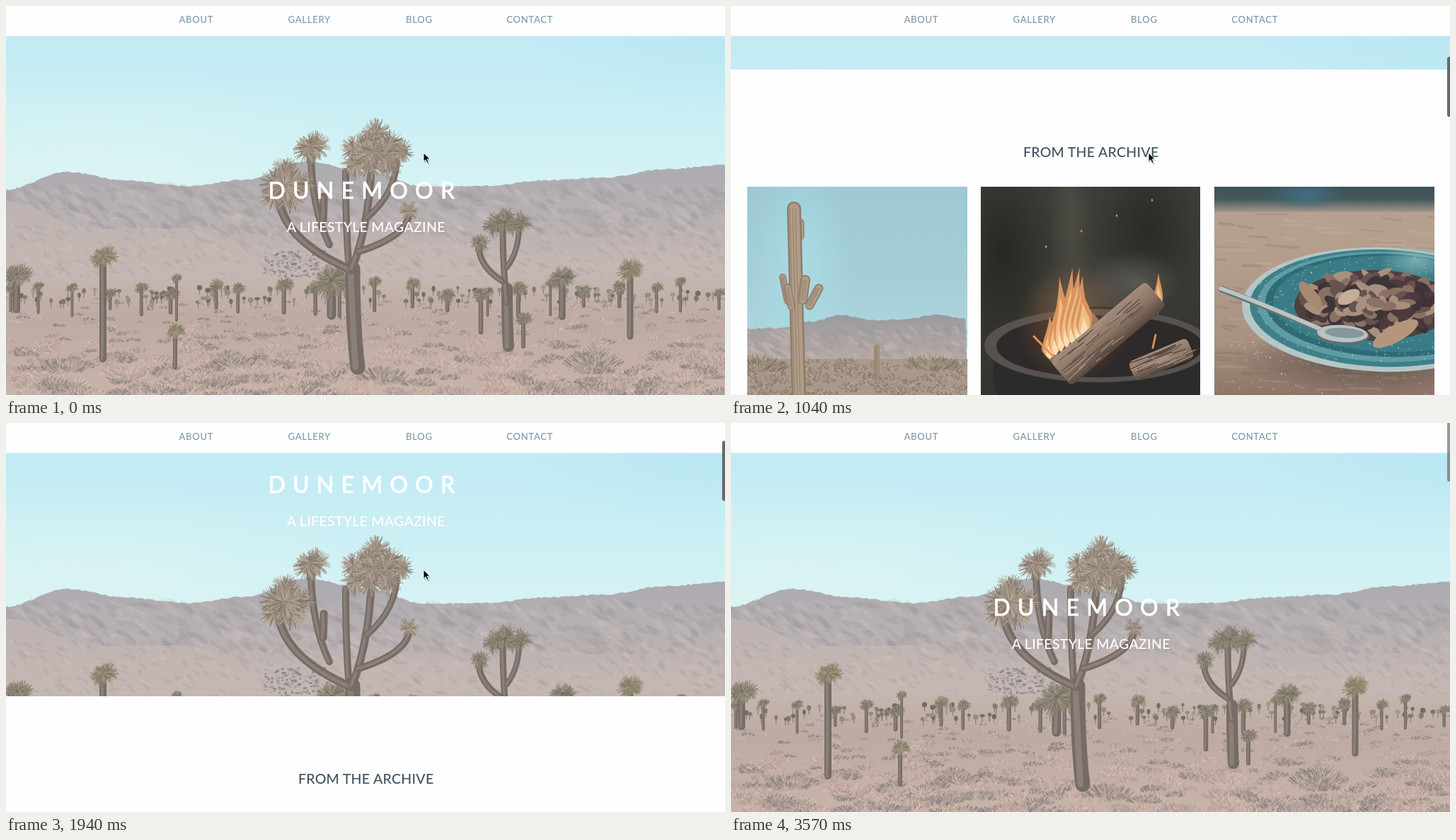
An HTML page with a canvas that plays this animation: 1016x551 px, repeating every 3.67 s.

```html
<!DOCTYPE html>
<html lang="en">
<head>
<meta charset="utf-8">
<title>Magazine page scroll</title>
<style>
  html, body { margin: 0; width: 100%; height: 100%; overflow: hidden; background: #fefefe; }
  #stage { position: absolute; left: 0; top: 0; width: 1016px; height: 551px; overflow: hidden; }
  #page, #flow, canvas, svg { position: absolute; left: 0; top: 0; }
  #page, #flow { width: 1016px; will-change: transform; }
  #paper { position: absolute; top: 561px; width: 1016px; height: 700px; background: #fefefe; }
  #paper canvas { top: 166px; }
  text { font-family: Lato, "Open Sans", sans-serif; font-weight: 500; }
  .nav { font-size: 13px; letter-spacing: .75px; fill: #7c98a9; text-anchor: middle; }
  .hero { fill: #fff; }
  .title { font-size: 32px; letter-spacing: 10.2px; stroke: #fff; stroke-width: .6px; }
  .line { font-size: 19.5px; letter-spacing: .3px; text-anchor: middle; }
  .heading { fill: #42525d; }
  #thumb { position: absolute; left: 1012px; top: 0; width: 8px; height: 85px; border-radius: 3px; background: #5f6162; }
</style>
</head>
<body>
<div id="stage">
  <div id="page">
    <canvas id="desert" width="1016" height="570"></canvas>
    <div id="flow">
      <svg width="1016" height="561">
        <text class="hero title" x="370.5" y="272.5">DUNEMOOR</text>
        <text class="hero line" x="508.7" y="319.6">A LIFESTYLE MAGAZINE</text>
      </svg>
      <div id="paper">
        <svg width="1016" height="160"><text class="heading line" x="508.7" y="124">FROM THE ARCHIVE</text></svg>
        <canvas id="cactus" width="311" height="330" style="left:23px"></canvas>
        <canvas id="fire" width="310" height="330" style="left:353px"></canvas>
        <canvas id="plate" width="311" height="330" style="left:683px"></canvas>
      </div>
    </div>
    <svg width="1016" height="43">
      <rect width="1016" height="42.4" fill="#fefefe"/>
      <text class="nav" x="268.8" y="24">ABOUT</text>
      <text class="nav" x="428.8" y="24">GALLERY</text>
      <text class="nav" x="583.8" y="24">BLOG</text>
      <text class="nav" x="740.2" y="24">CONTACT</text>
    </svg>
  </div>
  <div id="thumb"></div>
  <svg id="cursor" width="1016" height="551">
    <path d="M591 210v12.5l3-2.8 2.2 4.8 2.2-1-2.2-4.6h4z" opacity=".25"/>
    <path d="M590 208v12.4l2.9-2.7 2.1 4.8 2.2-1-2.1-4.6h4z" stroke="#fff" stroke-width=".9"/>
  </svg>
</div>
<script>
let g, seed;
const $ = id => document.getElementById(id);
const rnd = (a = 0, b = 1) => {
  seed = (seed * 1664525 + 1013904223) >>> 0;
  return a + (b - a) * seed / 4294967296;
};
const pick = list => list[Math.floor(rnd(0, list.length))];
const times = (n, fn) => { for (let i = 0; i < n; i++) fn(i); };
// Calls fn at n seeded places in a box, from top to bottom.
const scatter = (n, x0, x1, y0, y1, fn) => times(n, i => fn(rnd(x0, x1), y0 + (y1 - y0) * (i + .5) / n, i / n));
// Calls fn at n evenly packed places in an ellipse, outermost first.
const pack = (n, x, y, rx, ry, fn) => times(n, i => {
  const d = Math.sqrt((n - 1 - i) / n), a = i * 2.4;
  fn(x + rx * d * Math.cos(a), y + ry * d * Math.sin(a));
});

function picture(id, draw) {
  g = $(id).getContext('2d');
  seed = 7;
  g.lineCap = g.lineJoin = 'round';
  draw(g.canvas.width, g.canvas.height);
}
function line(color, width, x0, y0, x1, y1, cx = (x0 + x1) / 2, cy = (y0 + y1) / 2) {
  g.beginPath();
  g.moveTo(x0, y0);
  g.quadraticCurveTo(cx, cy, x1, y1);
  g.strokeStyle = color;
  g.lineWidth = width;
  g.stroke();
}
function blob(fill, x, y, rx, ry, turn = 0) {
  g.beginPath();
  g.ellipse(x, y, rx, ry, turn, 0, 7);
  g.fillStyle = fill;
  g.fill();
}
function fade(y0, y1, ...colors) {
  const f = g.createLinearGradient(0, y0, 0, y1);
  colors.forEach((c, i) => f.addColorStop(i / (colors.length - 1), c));
  return f;
}
function band(y0, y1, ...colors) {
  g.fillStyle = fade(y0, y1, ...colors);
  g.fillRect(0, y0, g.canvas.width, y1 - y0);
}
function glow(rgb, alpha, x, y, rx, ry) {
  g.save();
  g.translate(x, y);
  g.scale(rx, ry);
  const f = g.createRadialGradient(0, 0, 0, 0, 0, 1);
  f.addColorStop(0, `rgba(${rgb},${alpha})`);
  f.addColorStop(1, `rgba(${rgb},0)`);
  g.fillStyle = f;
  g.fillRect(-1, -1, 2, 2);
  g.restore();
}
// Skyline through evenly spaced heights, smoothed and slightly rough.
function ridge(fill, bottom, heights) {
  const w = g.canvas.width;
  g.beginPath();
  g.moveTo(0, bottom);
  for (let x = 0; x <= w; x += 4) {
    const u = x / w * (heights.length - 1), i = Math.min(Math.floor(u), heights.length - 2);
    const ease = (1 - Math.cos((u - i) * Math.PI)) / 2;
    g.lineTo(x, heights[i] + (heights[i + 1] - heights[i]) * ease + rnd(-1, 1));
  }
  g.lineTo(w, bottom);
  g.fillStyle = fill;
  g.fill();
}
function shade(n, y0, y1, size) {
  scatter(n, 0, g.canvas.width, y0, y1, (x, y) =>
    blob(pick(['rgba(138,138,150,.16)', 'rgba(150,140,140,.16)', 'rgba(212,200,196,.22)']),
      x, y, rnd(.3, 1) * size, rnd(.15, .3) * size, rnd(.2, .9)));
}

const LEAF = ['#b5a797', '#998b7d', '#81766a', '#a69786', '#c2b3a3', '#766c61'];
const GREEN = ['#9d967b', '#857e69', '#7b7364', '#aca384'];
const DARK = ['#827a6d', '#746c63', '#958c7a', '#a39b86'];
function tuft(x, y, r, tones) {
  blob(tones[1], x, y, r * .55, r * .55);
  times(r * 8, () => {
    const a = rnd(0, 6.283), d = r * rnd(.5, 1.1), c = Math.cos(a), s = Math.sin(a);
    line(pick(tones), .8, x + c * d * .3, y + s * d * .3, x + c * d, y + s * d);
  });
}
const crown = (n, x, y, rx, ry, r, tones = LEAF) =>
  pack(n, x, y, rx, ry, (tx, ty) => tuft(tx, ty, r * rnd(.85, 1.1), tones));
// A limb leaves sideways and then turns upwards.
function limb(width, x0, y0, x1, y1) {
  const cy = y0 + (y1 - y0) * .4;
  line('#766b66', width, x0, y0, x1, y1, x1, cy);
  line('#8b7f77', width * .4, x0 - width * .15, y0, x1 - width * .15, y1, x1, cy);
}
function tree(x, base, top, r, tones = DARK) {
  limb(r * .5, x, base, x, top);
  crown(3, x, top, r * .5, r * .6, r * .75, tones);
}
function shrub(x, y, r, tones) {
  times(r * 4, () => {
    const a = rnd(-3.1, -.05), d = r * Math.sqrt(rnd());
    const px = x + Math.cos(a) * d, py = y + Math.sin(a) * d * .55;
    line(pick(tones), 1.1, px, py, px + Math.cos(a) * r * .2, py - r * .15);
  });
}

picture('desert', (w, h) => {
  band(0, 280, '#bfe9f4', '#c5ecf4', '#cef0f4', '#d9f3f4');
  glow('222,244,242', .7, 110, 215, 420, 130);
  glow('178,228,242', .5, 1010, 60, 280, 90);

  ridge(fade(225, 390, '#acabb1', '#b9b1b1', '#c6b8b5'), 430,
    [260, 235, 247, 255, 246, 220, 234, 256, 255, 247, 243, 231, 225]);
  shade(500, 255, 325, 16);
  ridge(fade(275, 395, '#beb3b1', '#c5b7b3'), 430, [277, 316, 315, 344, 338, 335, 346, 340, 340]);
  shade(500, 310, 386, 9);
  scatter(160, 365, 455, 347, 384, (x, y) => blob(pick(['#8a8484', '#a09897', '#b9adab']), x, y, rnd(1, 3), rnd(1, 2)));

  band(384, h, '#c5b5af', '#bcaaa3', '#c4b0a9', '#cab4ac');
  const BRUSH = [
    ['#b5a19a', '#c8b5ac', '#a69690'],
    ['#978c86', '#aa9d96', '#857c77', '#b5a79e'],
    ['#c6aea4', '#d4beb3', '#b59f97'],
  ];
  scatter(160, 0, w, 398, 420, (x, y) => {
    line('#877e77', 1.2, x, y + 9, x, y);
    blob(pick(DARK), x, y, rnd(2, 4), rnd(2, 4));
  });
  scatter(650, 0, w, 414, h, (x, y, depth) => shrub(x, y, 4 + depth * 24 * rnd(.4, 1), pick(BRUSH)));
  times(9, i => shrub(60 + i * 125 + rnd(-30, 30), 520 + 12 * Math.sin(i * 2), rnd(25, 42), BRUSH[1 + i % 2]));

  // Middle distance: a loose row of small trees, then a few that stand out.
  times(22, i => tree(i * 48 + rnd(-10, 10), rnd(425, 440), rnd(388, 408), rnd(7, 13)));
  tree(15, 430, 380, 20);
  tree(460, 438, 388, 26);
  tree(786, 440, 384, 19);
  tree(241, 445, 385, 8);
  tree(239, 512, 459, 12, GREEN);
  tree(137, 500, 354, 20, GREEN);
  tree(882, 468, 372, 18, GREEN);

  limb(16, 710, 482, 708, 400);
  limb(9, 708, 420, 702, 308);
  limb(8, 708, 370, 725, 312);
  limb(9, 702, 390, 668, 338);
  crown(6, 705, 306, 26, 10, 15, DARK);
  crown(2, 667, 336, 6, 5, 12, DARK);
  tree(671, 462, 408, 13);
  tree(731, 482, 442, 12);

  limb(21, 497, 512, 490, 372);
  limb(12, 488, 374, 385, 262);
  limb(10, 457, 338, 431, 205);
  limb(11, 489, 372, 517, 195);
  limb(10, 484, 360, 480, 235);
  limb(9, 510, 300, 553, 210);
  limb(10, 498, 348, 570, 291);
  limb(11, 448, 304, 449, 270);
  crown(7, 393, 254, 24, 27, 22);
  crown(3, 430, 198, 9, 14, 19);
  crown(11, 520, 206, 40, 30, 19);
  crown(1, 570, 290, 0, 0, 16);
});

picture('cactus', (w, h) => {
  band(0, 230, '#9dc9d4', '#a3ccd6', '#aed8df');
  glow('170,222,230', .9, 75, 110, 75, 140);
  ridge(fade(180, 245, '#989a9f', '#aaa3a1', '#b5a9a4'), 260, [201, 200, 191, 182, 189, 188, 181, 187]);
  shade(150, 200, 242, 12);
  band(244, h, '#aa9b8c', '#a99788', '#b9a598');
  scatter(220, 0, w, 250, h, (x, y) => shrub(x, y, rnd(5, 16), ['#9c8d7e', '#b8a799', '#85796c']));
  [15, 260].forEach(x => shrub(x, 262, 36, ['#92846f', '#a6967e', '#7d7363']));
  const rib = (width, x0, y0, x1, y1) => {
    line('#8d7c6b', width, x0, y0, x1, y1);
    line('#b09b86', width * .75, x0, y0, x1, y1);
    for (let k = -.3; k <= .3; k += .2) line('#8c7b6a', .8, x0 + k * width, y0, x1 + k * width, y1);
  };
  rib(7, 183, 275, 183, 227);
  rib(11, 75, 51, 75, 70);
  rib(10, 50, 128, 57, 162);
  rib(20, 66, 31, 73, 305);
  rib(11, 57, 143, 62, 169);
  rib(13, 101, 144, 88, 168);
  rib(14, 82, 132, 78, 160);
});

function flame(x, y, width, height, lean) {
  [['#d9945f', 1], ['#f0bd84', .75], ['#f9dcb2', .45]].forEach(([color, k]) => {
    const a = width * k, b = height * k;
    g.beginPath();
    g.moveTo(x, y);
    g.bezierCurveTo(x - a, y - b * .2, x - a * .2, y - b * .5, x + lean * k, y - b);
    g.bezierCurveTo(x + a * .3, y - b * .6, x + a, y - b * .4, x, y);
    g.fillStyle = color;
    g.fill();
  });
}
function log(x, y, length, thick, turn) {
  g.save();
  g.translate(x, y);
  g.rotate(turn);
  g.fillStyle = fade(-thick / 2, thick / 2, '#a38c7b', '#8d7667', '#58483f');
  g.beginPath();
  g.roundRect(-length / 2, -thick / 2, length, thick, 7);
  g.fill();
  scatter(34, -length / 2, length / 4, -thick * .45, thick * .45, (gx, gy) =>
    line(pick(['#4d403a', '#665449', '#b69f8d']), 1, gx, gy, gx + rnd(15, 45), gy + rnd(-2, 2)));
  g.restore();
}

picture('fire', (w, h) => {
  band(0, h, '#3d3e38', '#393832', '#33322f');
  glow('88,86,78', .6, 128, 50, 32, 140);
  glow('28,30,27', .65, 30, 90, 75, 150);
  glow('30,31,27', .6, 235, 60, 75, 120);
  glow('126,124,120', .5, 220, 135, 65, 45);
  glow('98,94,88', .5, 150, 150, 85, 60);
  blob('#2c2b2b', 165, 265, 148, 95);
  blob('#575150', 165, 225, 160, 52);
  blob('#2e2a29', 168, 226, 146, 44);
  log(130, 215, 90, 40, -.7);
  log(255, 245, 90, 30, -.4);
  glow('226,135,66', .35, 130, 195, 80, 85);
  times(7, i => flame(98 + i * 8, 244 - i * 5, 22, 60 + 55 * Math.sin(i * .5), rnd(-4, 10)));
  flame(250, 180, 14, 58, 1);
  log(180, 208, 176, 46, -.7);
  line('#e8964f', 3, 75, 212, 102, 240);
  line('#d98f55', 3, 247, 210, 243, 228);
  times(4, i => blob('#d98a4f', 92 + i * 50, 85 - i * 22, 1.4, 1.8));
});

picture('plate', (w, h) => {
  band(0, h, '#b7a393', '#b39c8a', '#a89180', '#80695d');
  band(0, 36, '#3c5157', '#445a5e', '#a79789');
  glow('66,116,138', .8, 130, 10, 55, 26);
  scatter(160, -20, w, 38, h, (x, y) =>
    line(pick(['rgba(210,192,176,.22)', 'rgba(115,92,78,.2)']), rnd(1, 4), x, y, x + rnd(10, 45), y + rnd(0, 4)));
  glow('55,45,42', .6, 220, 245, 200, 50);
  ['#b4c6c6', '#3f7f88', '#5d9da3', '#2f6b76', '#3a7c86'].forEach((color, i) =>
    blob(color, 236 + i * 3, 174 - i * 2, 197 - i * 8, 88 - i * 5, .03));
  glow('160,205,205', .6, 285, 105, 50, 26);
  scatter(430, 48, w, 100, 250, (x, y) => blob('rgba(205,223,222,.6)', x, y, rnd(.4, 1.3), rnd(.4, 1.1)));
  blob('#50403f', 225, 168, 112, 50);
  pack(110, 228, 164, 105, 42, (x, y) =>
    blob(pick(['#3f3438', '#66524e', '#8b7064', '#4c3b3e', '#a8907f']), x, y, rnd(6, 17), rnd(4, 9), rnd(-1, 1)));
  blob('#a78972', 136, 154, 24, 9, .9);
  blob('#b5967d', 256, 208, 36, 12, -.5);
  blob('#c6ad99', 190, 156, 17, 9, -.5);
  line('#647679', 9, 10, 145, 150, 203, 65, 166);
  line('#bdc4c3', 6, 9, 144, 155, 204, 65, 164);
  blob('#5d6f72', 181, 210, 38, 14, .06);
  blob('#b9c2c1', 181, 208, 36, 12, .06);
  blob('#84979a', 184, 207, 28, 7, .06);
  scatter(100, 0, w, 215, h, (x, y) => blob('rgba(231,223,214,.65)', x, y, rnd(.4, 1.2), rnd(.4, 1)));
});

// The scroll advances in ticks: a swipe down, a swipe back, then a flick past the top that springs back.
const LOOP = 3670, FIRST = 440, TICK = 149, BOTTOM = 481, PAUSE = 148, PULL = -8;
const glide = (from, to, n) => to + (from - to) * Math.exp(-.197 * n ** 1.85);
function scrollAt(tick) {
  if (tick < 0) return 0;
  if (tick < 7) return glide(0, BOTTOM, tick + 1);
  if (tick < 12) return glide(BOTTOM, PAUSE, tick - 6);
  if (tick < 15) return Math.max(PULL, PAUSE - 27 * (tick - 11) ** 2.6);
  return Math.round(PULL * .38 ** (tick - 14));
}
const shift = (id, y) => $(id).style.transform = `translateY(${y}px)`;
const start = performance.now();

function render() {
  const t = (performance.now() - start) % LOOP;
  const tick = Math.floor((t - FIRST) / TICK);
  const scroll = Math.round(scrollAt(tick));
  shift('page', Math.max(0, -scroll));
  shift('flow', -Math.max(0, scroll));
  shift('thumb', -2 + scroll * .157);
  $('thumb').style.opacity = tick < 0 ? 0 : t < 3570 ? .95 : .65;
  $('cursor').style.opacity = tick < 17 ? 1 : 0;
  requestAnimationFrame(render);
}
render();
</script>
</body>
</html>
```
